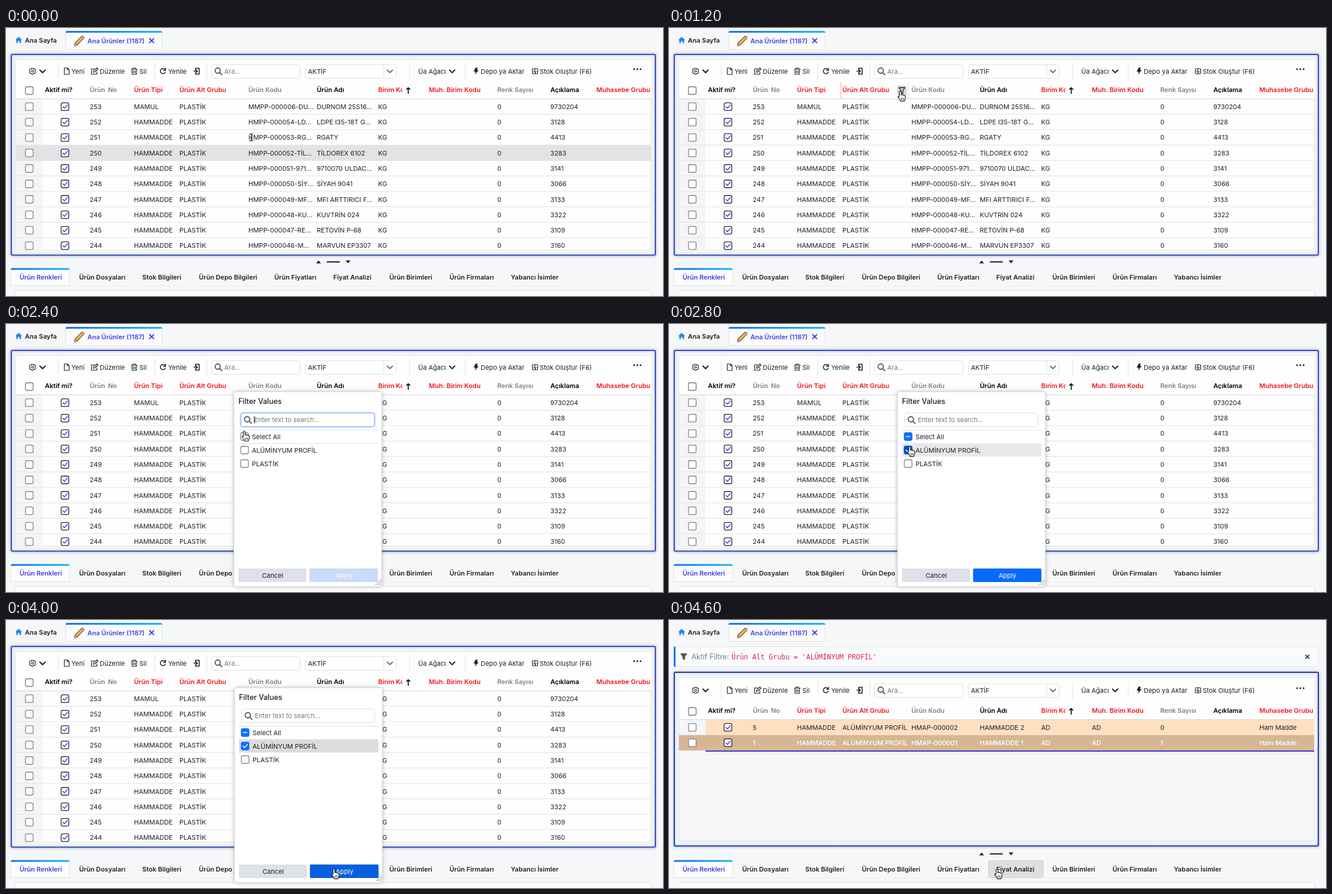
Write an HTML page with a canvas that moves like this. It is 1114 px wide and 456 px high and loops after 5 s.

```html
<!DOCTYPE html>
<html lang="tr">
<head>
<meta charset="utf-8">
<style>
html, body { margin: 0; width: 100%; height: 100%; overflow: hidden; background: #f6f7f8; }
canvas { display: block; width: 1114px; height: 456px; }
</style>
</head>
<body>
<canvas id="stage" width="1114" height="456"></canvas>
<script>
const ctx = document.getElementById('stage').getContext('2d');
const LOOP = 5000, STEP = 200;
const INK = '#1d1f23', RED = '#f5141c', GREY = '#7d7f83', BLUE = '#0d6efd', VIOLET = '#3f3fe8';
const LINE = '#e1e2e5', ROW_HEIGHT = 26.27;

// [x, title, colour]
const COLUMNS = [
  [66, 'Aktif mi?', '#000'], [142, 'Ürün', GREY], [173, 'No', GREY], [217, 'Ürün Tipi', RED],
  [294, 'Ürün Alt Grubu', RED], [411, 'Ürün Kodu', GREY], [527, 'Ürün Adı', '#000'],
  [717, 'Muh. Birim Kodu', RED], [833, 'Renk Sayısı', GREY], [923, 'Açıklama', '#000']
];
const CELL_X = [142, 217, 294, 411, 527, 631, 717, 833, 923, 1001];
const PRODUCTS = [
  ['000006-DU...', 'DURNOM 25S16...', '9730204'],
  ['000054-LD...', 'LDPE I35-18T G...', '3128'],
  ['000053-RG...', 'RGATY', '4413'],
  ['000052-TİL...', 'TİLDOREX 6102', '3283'],
  ['000051-971...', '9710070 ULDAC...', '3141'],
  ['000050-SİY...', 'SİYAH 9041', '3066'],
  ['000049-MF...', 'MFI ARTTIRICI F...', '3133'],
  ['000048-KU...', 'KUVTRİN 024', '3322'],
  ['000047-RE...', 'RETOVİN P-68', '3109'],
  ['000046-M...', 'MARVUN EP3307', '3160']
].map(([code, name, note], i) => [253 - i, i ? 'HAMMADDE' : 'MAMUL', 'PLASTİK',
  (i ? 'HMPP-' : 'MMPP-') + code, name, 'KG', '', '0', note, '']);
const FILTERED = [5, 1].map((no, i) => [no, 'HAMMADDE', 'ALÜMİNYUM PROFİL', 'HMAP-00000' + (2 - i),
  'HAMMADDE ' + (2 - i), 'AD', 'AD', i, '', 'Ham Madde']);
const TABS = [[23, 'Ürün Renkleri'], [124, 'Ürün Dosyaları'], [231, 'Stok Bilgileri'],
  [327, 'Ürün Depo Bilgileri'], [455, 'Ürün Fiyatları'], [555, 'Fiyat Analizi'],
  [650, 'Ürün Birimleri'], [752, 'Ürün Firmaları'], [856, 'Yabancı İsimler']];

// [time, x, y] of the pointer
const POINTER = [[0, 416, 186], [200, 405, 140], [400, 394, 116], [2000, 394, 116], [2600, 410, 217],
  [3000, 410, 217], [3600, 558, 432], [5000, 558, 432]];

function text(s, x, y, color = INK, weight = 400, size = 11, family = 'Inter, sans-serif') {
  ctx.font = `${weight} ${size}px ${family}`;
  ctx.fillStyle = color;
  ctx.fillText(s, x, y + size * 0.365);
}
function box(x, y, w, h, fill, stroke, radius = 0, lineWidth = 1) {
  ctx.beginPath();
  ctx.roundRect(x, y, w, h, radius);
  if (fill) { ctx.fillStyle = fill; ctx.fill(); }
  if (stroke) { ctx.strokeStyle = stroke; ctx.lineWidth = lineWidth; ctx.stroke(); }
}
function icon(d, x, y, stroke = INK, width = 1.3, fill) {
  const path = new Path2D(d);
  ctx.save();
  ctx.translate(x, y);
  ctx.lineJoin = ctx.lineCap = 'round';
  if (fill) { ctx.fillStyle = fill; ctx.fill(path); }
  if (stroke) { ctx.strokeStyle = stroke; ctx.lineWidth = width; ctx.stroke(path); }
  ctx.restore();
}
function clipped(x, y, w, h, draw) {
  ctx.save();
  ctx.beginPath();
  ctx.rect(x, y, w, h);
  ctx.clip();
  draw();
  ctx.restore();
}
function shadowed(color, blur, draw) {
  ctx.save();
  ctx.shadowColor = color;
  ctx.shadowBlur = blur;
  draw();
  ctx.restore();
}
function checkbox(x, y, border, fill = '#fff', mark) {
  box(x - 6.5, y - 6.5, 13, 13, fill, border, 2.5, 1.3);
  if (mark) icon('M-3.5 0L-1 2.7L4-3', x, y, mark, 1.5);
}
const chevron = (x, y, color, width) => icon('M-4.5-2L0 2.5L4.5-2', x, y, color, width);
const magnifier = (x, y) => icon('M4-1A4.5 4.5 0 1 1-5-1A4.5 4.5 0 1 1 4-1M2.7 2.3L6.5 6', x, y, '#555', 1.8);
const funnel = (x, y, color, fill) => icon('M-5-5H5L1.5 0V5L-1.5 3V0Z', x, y, color, 1.3, fill);

function blueBar(x, y, w) {
  const gradient = ctx.createLinearGradient(x, 0, x + w, 0);
  gradient.addColorStop(0, '#1470f5');
  gradient.addColorStop(1, '#12b9ff');
  box(x, y, w, 3, gradient, null, [3, 3, 0, 0]);
}

function drawPageTabs() {
  icon('M-6 0L0-5.5L6 0H4V5H1.3V1.5H-1.3V5H-4V0Z', 21.5, 20.5, null, 0, '#1787ee');
  text('Ana Sayfa', 32, 20.5, INK, 600);
  box(101.5, 6.5, 163, 30, '#fbfbfc', '#e0e1e5', [3, 3, 0, 0]);
  blueBar(101, 5, 164);
  icon('M-5 5L5-5', 124.5, 21.5, '#3b3428', 6);
  icon('M-5 5L5-5', 124.5, 21.5, '#f0b545', 4);
  icon('M5-5L6-6', 125, 21, '#e58b91', 4);
  icon('M-8 8L-7 3.5L-3.5 7Z', 124, 22, '#3b3428', 0.8, '#e8cfa8');
  text('Ana Ürünler (1187)', 138, 21.5, VIOLET, 600);
  icon('M-3.5-3.5L3.5 3.5M3.5-3.5L-3.5 3.5', 247, 21.5, VIOLET, 1.8);
}

function drawToolbar(y) {
  for (const x of [88.5, 252.5, 340.5, 684.5, 778.5]) icon('M0-13V14', x, y, LINE, 1);
  icon('M-1.5-5H1.5L2-3.5L4-4L5.2-1.5L4 0L5.2 1.5L4 4L2 3.5L1.5 5H-1.5L-2 3.5L-4 4L-5.2 1.5L-4 0L-5.2-1.5L-4-4L-2-3.5Z' +
    'M1.7 0A1.7 1.7 0 1 1-1.7 0A1.7 1.7 0 1 1 1.7 0', 45, y, INK, 1.1);
  chevron(62, y, INK, 2);
  icon('M-4-5.5H1L4-2.5V5.5H-4ZM1-5.5V-2.5H4', 103, y, INK, 1.2);
  text('Yeni', 111, y);
  icon('M0-4H-5V5H4V1M-2 2L-1.5-.5L4-5.5L6-3.5L.5 1.5Z', 150, y, INK, 1.2);
  text('Düzenle', 159, y);
  icon('M-5-3.5H5M-2-3.5V-5.5H2V-3.5M-4-3.5L-3.5 5.5H3.5L4-3.5M-1.3-1V3M1.3-1V3', 217.5, y, INK, 1.2);
  text('Sil', 226, y);
  icon('M4 1.5A4.3 4.3 0 1 1 3-3.2M4.5-5V-1.5H1', 266, y, INK, 1.5);
  text('Yenile', 275, y);
  icon('M-2-2V-5H4V5H-2V2M-5 0H1M-1-2L1 0L-1 2', 323.5, y, INK, 1.6);
  box(348.5, y - 11, 150, 23, '#fff', '#dfe0e4', 3);
  magnifier(359.5, y);
  text('Ara...', 370, y, '#777');
  box(507.5, y - 11, 154, 23, '#fff', '#dfe0e4', 3);
  icon('M0-11V12', 640.5, y, '#dfe0e4', 1);
  text('AKTİF', 512, y + 0.5);
  chevron(651, y, '#444', 1.5);
  text('Üa Ağacı', 699, y + 0.5);
  chevron(756.5, y, INK, 2);
  icon('M-1-6H3L1.5-2H4.5L-2 6L-.5 .8H-4Z', 797, y, null, 0, INK);
  text('Depo ya Aktar', 805, y);
  box(892.5, y - 4.5, 9, 9, null, INK, 1.5, 1.2);
  icon('M.5-3.5L-2 .5H2L-.5 3.5', 897, y, INK, 1.2);
  text('Stok Oluştur (F6)', 905, y);
  for (const x of [1065, 1070.5, 1076]) box(x - 1.5, y - 5, 3, 3, INK, null, 1.5);
}

function drawHeader(y, hover) {
  if (hover) {
    icon('M0-11V16', 291.5, y, '#f3a0a3', 1);
    icon('M0-11V16', 406.5, y, LINE, 1);
  }
  checkbox(39.5, y + 2, '#777');
  for (const [x, title, color] of COLUMNS) text(title, x, y, color, 600);
  clipped(600, y - 11, 72, 24, () => text('Birim Kodu', 631, y, RED, 600));
  icon('M0 5V-5M-3-2L0-5L3-2', 682, y + 2, '#000', 1.6);
  clipped(1000, y - 11, 92, 24, () => text('Muhasebe Grubu', 1001, y, RED, 600));
  icon('M17 0H1094', 0, y + 16, '#d3d4d8', 1);
}

function drawRows(rows, top, hovered) {
  rows.forEach((cells, i) => {
    const y = top + i * ROW_HEIGHT, mid = y + 13.2;
    const filtered = rows === FILTERED, selected = filtered && i === 1;
    if (filtered) box(selected ? 17 : 62, y, selected ? 1077 : 1032, ROW_HEIGHT, selected ? '#d6b693' : '#fee0c1');
    else if (i === hovered) box(17, y, 1077, ROW_HEIGHT, '#e3e3e5');
    checkbox(39.5, mid, '#828385');
    checkbox(100, mid, '#25262b', '#fff', VIOLET);
    cells.forEach((cell, c) => text(cell, CELL_X[c], mid, selected ? '#fff' : INK, selected ? 500 : 400));
    if (!filtered) icon('M17 0H1094', 0, y + ROW_HEIGHT - 0.3, LINE, 1);
  });
}

function drawGrid(filtered, headerHover, hoveredRow) {
  const top = filtered ? 89 : 45, bottom = filtered ? 385 : 387;
  const headerY = filtered ? 153.5 : 104.5, rowsTop = filtered ? 169.5 : 120.7;
  shadowed('rgba(60,80,200,.4)', 5, () =>
    box(9, top, 1092, bottom - top - 0.5, '#f6f7fa', filtered ? '#263e90' : '#3a4cad', 2, 2));
  box(16.5, top + 8.5, 1077, bottom - top - 17.5, filtered ? '#f5f6f7' : '#fefefe', '#dedfe3', 2);
  clipped(17, top + 9, 1077, bottom - top - 18, () => {
    box(17, top + 9, 1077, headerY + 7 - top, '#fefefe');
    if (!filtered) box(17, rowsTop, 45, 260, '#f4f5f6');
    drawToolbar(top + (filtered ? 30.5 : 28.5));
    drawRows(filtered ? FILTERED : PRODUCTS, rowsTop, hoveredRow);
    drawHeader(headerY, headerHover);
    if (filtered) box(62, 222, 1032, 2, '#3b36d8');
  });
}

function drawFilterBar() {
  box(8.5, 45.5, 1093, 34, '#f9fafb', '#e2e4e8', 4);
  box(8, 45, 3, 35, BLUE, null, [3, 0, 0, 3]);
  funnel(25, 62.5, '#555', '#555');
  text('Aktif Filtre:', 38, 62.5, '#7b7e84', 400, 12.5);
  text("Ürün Alt Grubu = 'ALÜMİNYUM PROFİL'", 106, 62.5, '#dd2454', 400, 11.7, '"DejaVu Sans Mono", monospace');
  icon('M-3-3L3 3M3-3L-3 3', 1082.5, 62.5, INK, 1.5);
}

function drawDetailTabs(hover) {
  icon('M-4 2L0-3L4 2Z', 530, 398.5, null, 0, INK);
  box(544, 397, 22, 2, INK);
  icon('M-4-2L0 3L4-2Z', 580, 397.5, null, 0, INK);
  icon('M8 0H1102', 0, 438.5, '#eceDf0', 1);
  box(8.5, 410.5, 99, 28, '#fcfcfd', '#e4e5e9', [3, 3, 0, 0]);
  blueBar(8, 408.5, 100);
  if (hover) box(541.5, 409.5, 93, 29, '#dedfe0', '#d2d3d5', 3);
  TABS.forEach(([x, title], i) => text(title, x, 424, i ? INK : VIOLET, 600));
  box(15.5, 446.5, 1079, 20, '#fdfdfd', '#e1e2e6', 3);
}

function drawPopup(checked, hoverOption) {
  ctx.save();
  ctx.translate(checked ? 1 : 0, 0);
  shadowed('rgba(0,0,0,.3)', 7, () => box(386.5, 115.5, 250.5, 331, '#fff', null, 3));
  box(386.5, 115.5, 250.5, 331, '#fff', '#dcdde0', 3);
  text('Filter Values', 394, 131, INK, 500, 12.5);
  if (!checked) box(398, 151.5, 227, 23, null, '#cfe2ff', 4, 4);
  box(398.5, 151.5, 226, 23, '#fff', checked ? '#dfe0e4' : '#7fb0f7', 3);
  magnifier(409.5, 163);
  text('Enter text to search...', 421, 163, '#74777c');
  if (!checked) icon('M0-6V6', 421, 163, '#000', 1);
  icon('M394 0H630M394 23H630', 0, 180.5, LINE, 1);
  if (hoverOption) box(394, 203, 236.5, 22.5, hoverOption);
  if (checked) {
    checkbox(404.5, 191.5, BLUE, BLUE);
    icon('M-3 0H3', 404.5, 191.5, '#fff', 1.6);
    checkbox(404.5, 214.5, BLUE, BLUE, '#fff');
  } else {
    checkbox(404.5, 191.5, '#85878b');
    checkbox(404.5, 214.5, '#85878b');
  }
  checkbox(404.5, 237.5, '#85878b');
  text('Select All', 417, 191.5);
  text('ALÜMİNYUM PROFİL', 417, 215);
  text('PLASTİK', 417, 237.5);
  box(394, 416, 115, 23, '#dde1e8', null, 2);
  text('Cancel', 434, 428);
  box(514.5, 416, 116, 23, checked ? '#066bfb' : '#cadaf9', null, 2);
  text('Apply', 558, 428, '#fff');
  for (let i = 0; i < 4; i++)
    for (let j = 0; j <= i; j++) box(634 - j * 2.6, 435 + i * 2.6, 1.3, 1.3, '#777');
  ctx.restore();
}

function pointerAt(t) {
  const next = Math.max(1, POINTER.findIndex(p => p[0] >= t));
  const [t0, x0, y0] = POINTER[next - 1], [t1, x1, y1] = POINTER[next];
  const p = (t - t0) / (t1 - t0), ease = p * p * (3 - 2 * p);
  return [x0 + (x1 - x0) * ease, y0 + (y1 - y0) * ease];
}
function drawPointer(t) {
  const [x, y] = pointerAt(t);
  if (t < 400) {
    const beam = 'M-3-6Q0-6 0-4Q0-6 3-6M0-4V4M-3 6Q0 6 0 4Q0 6 3 6M-1.5 1H1.5';
    icon(beam, x, y, '#fff', 2.6);
    icon(beam, x, y, '#111', 1.2);
    return;
  }
  icon('M3 1.5c0-2 3-2 3 0v5c.3-1 2.5-1 2.7.3c.6-.8 2.2-.5 2.4.6c.8-.6 2-.2 2 1v3c0 3-1.5 3-1.5 5.5' +
    'h-6.5c0-2-2.5-4-4-6.5c-1-1.6.6-2.6 2-1.2z', x - 6.5, y - 8.5, '#111', 1.1, '#fff');
  icon('M6.2 11.5V14.5M8.2 11.5V14.5M10.2 11.5V14.5', x - 6.5, y - 8.5, '#111', 0.8);
}

function draw(t) {
  const within = (from, to) => t >= from && t < to;
  const filtered = t >= 4600, headerHover = within(400, 2200);
  box(0, 0, 1114, 456, '#f6f7f8');
  drawPageTabs();
  if (filtered) drawFilterBar();
  drawGrid(filtered, headerHover, t === 0 ? 3 : t === 200 ? 0 : -1);
  drawDetailTabs(t >= 4400);
  if (headerHover) {
    box(387, 98, 16, 17, '#d4d5d9', null, 2);
    funnel(395, 106.5, t < 1200 ? '#77797e' : '#17181b');
  }
  if (within(1400, 4400)) {
    const hover = within(2600, 3200) ? '#e8e8ea' : t >= 3200 ? '#dcdcde' : null;
    drawPopup(t >= 2800, hover);
    if (within(2800, 3200)) checkbox(405.5, 214.5, '#0a52c4', '#0a52c4', '#fff');
    if (t >= 3600) {
      box(515.5, 416, 116, 23, '#075fdf', null, 2);
      text('Apply', 559, 428, '#fff');
    }
  }
  drawPointer(t);
}

function tick() {
  draw(Math.floor(performance.now() % LOOP / STEP) * STEP);
  requestAnimationFrame(tick);
}
tick();
</script>
</body>
</html>
```
